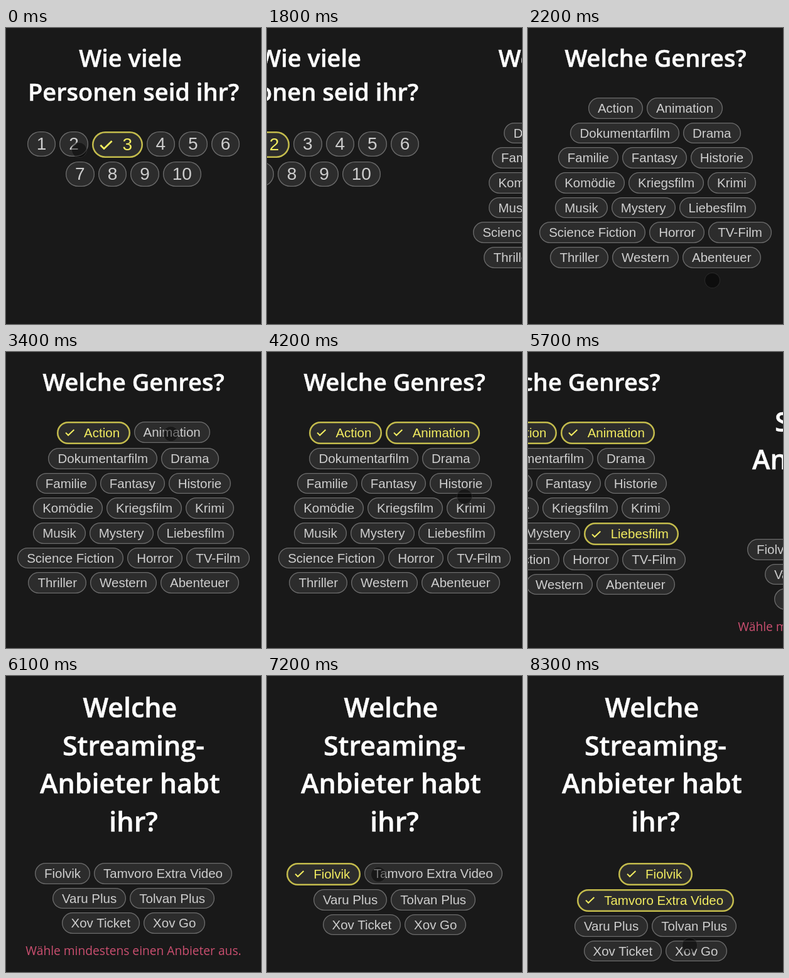
An HTML page for the animation above (8.4 s loop, 406 px wide and 472 px high).

```html
<!DOCTYPE html>
<html lang="de">
<head>
<meta charset="utf-8">
<title>Filmauswahl</title>
<style>
  html, body { margin: 0; width: 100%; height: 100%; overflow: hidden; background: #191919; }
  #stage { position: relative; width: 406px; height: 472px; overflow: hidden; }
  #track { position: absolute; inset: 0; }
  .screen { position: absolute; top: 0; width: 406px; height: 472px; }
  h1 {
    position: absolute; top: 20px; width: 100%; margin: 0;
    font: 600 38px/54px "Open Sans", "Noto Sans", sans-serif;
    text-align: center; white-space: pre; color: #fff; -webkit-text-stroke: .5px #fff;
  }
  .chips {
    position: absolute; width: 100%; display: flex; flex-direction: column; align-items: center; gap: 6px;
    font: 20.5px "Liberation Sans", Arial, sans-serif; --h: 33.7px;
  }
  .row { display: flex; flex-wrap: wrap; justify-content: center; align-items: flex-start; gap: 6px; width: 400px; }
  .chip {
    position: relative; padding: 0 15px; height: var(--h); line-height: var(--h); border-radius: 22px;
    white-space: nowrap; color: #cecece; background: #2c2c2c; box-shadow: inset 0 0 0 1.3px #6c6c6c;
  }
  .chip svg { display: none; position: absolute; left: 12.5px; top: 50%; width: .75em; height: .55em; margin-top: -.27em; }
  .chip path { fill: none; stroke: #f2ec60; stroke-width: 2; }
  .chip.on {
    height: calc(var(--h) + 2.3px); line-height: calc(var(--h) + 2.3px);
    padding: 0 16.5px 0 calc(27px + .77em); color: #f2ec60; box-shadow: inset 0 0 0 2.5px #c4bc4c;
  }
  .chip.on svg { display: block; }
  .digits .chips { font-size: 28px; --h: 40px; }
  .services h1 { font-size: 43px; line-height: 60.6px; }
  .services .row { width: 360px; }
  #hint {
    position: absolute; top: 424.5px; width: 100%; text-align: center; white-space: nowrap;
    font: 19.2px/26px "Open Sans", "Noto Sans", sans-serif; color: #cb4f70;
  }
  #cursor {
    position: absolute; left: -12.5px; top: -12.5px; width: 25px; height: 25px; box-sizing: border-box;
    border-radius: 50%; background: rgba(0, 0, 0, .45); border: 1px solid rgba(95, 95, 95, .35);
  }
</style>
</head>
<body>
<div id="stage"><div id="track"></div><div id="cursor"></div></div>
<script>
const LOOP = 8400, TICK = 100, STEP = 440, SLIDE_MS = 300;
const slideStarts = [1767, 5665];

// Trailing spaces in titles count when the lines are centred
const screens = [
  { kind: "digits", title: "Wie viele \nPersonen seid ihr?", top: 165,
    rows: ["1,2,3,4,5,6", "7,8,9,10"] },
  { kind: "genres", title: "Welche Genres?", top: 111,
    rows: ["Action,Animation", "Dokumentarfilm,Drama", "Familie,Fantasy,Historie", "Komödie,Kriegsfilm,Krimi",
      "Musik,Mystery,Liebesfilm", "Science Fiction,Horror,TV-Film", "Thriller,Western,Abenteuer"] },
  { kind: "services", title: "Welche \nStreaming-\nAnbieter habt \nihr?", top: 298,
    rows: ["Fiolvik,Tamvoro Extra Video", "Varu Plus,Tolvan Plus", "Xov Ticket,Xov Go"] }
];

// Chip label: [selected from, selected until]
const selected = {
  "3": [0, 200], "2": [200, LOOP],
  "Action": [2900, LOOP], "Animation": [3600, LOOP], "Liebesfilm": [4700, LOOP],
  "Fiolvik": [6900, LOOP], "Tamvoro Extra Video": [7500, LOOP]
};

// Pointer path: time, x, y
const path = [
  [0, 116, 194], [400, 116, 194], [700, 190, 411], [900, 230, 500],
  [1900, 300, 500], [2100, 297, 433], [2200, 293, 402], [2700, 140, 130], [3000, 140, 130],
  [3400, 262, 130], [3800, 262, 130], [4200, 314, 230], [4500, 300, 290], [4800, 300, 290],
  [5200, 300, 456], [5300, 300, 500], [6200, 260, 500], [6400, 230, 442], [6800, 92, 316],
  [7000, 92, 316], [7400, 262, 316], [7900, 262, 330], [8300, 257, 429], [LOOP, 257, 429]
];

const track = document.getElementById("track");
const cursor = document.getElementById("cursor");
const check = '<svg viewBox="0 0 15 11"><path d="M1 5.5 5 9.6 14 .9"/></svg>';
const chipHtml = name => `<div class="chip" data-name="${name}">${check}${name}</div>`;
const rowHtml = row => `<div class="row">${row.split(",").map(chipHtml).join("")}</div>`;

track.innerHTML = screens.map((s, i) =>
  `<section class="screen ${s.kind}" style="left:${i * STEP}px"><h1>${s.title}</h1>
  <div class="chips" style="top:${s.top}px">${s.rows.map(rowHtml).join("")}</div></section>`).join("");
track.lastElementChild.insertAdjacentHTML("beforeend",
  '<div id="hint">Wähle mindestens einen Anbieter aus.</div>');

const chips = [...track.querySelectorAll(".chip")];
const hint = document.getElementById("hint");
const clamp = v => Math.min(1, Math.max(0, v));
const easeOut = p => 1 - (1 - p) ** 3;

function pointerAt(t) {
  const i = path.findIndex(k => k[0] > t);
  const [t0, x0, y0] = path[i - 1], [t1, x1, y1] = path[i];
  const p = (t - t0) / (t1 - t0);
  return [x0 + (x1 - x0) * p, y0 + (y1 - y0) * p];
}

function draw(t) {
  const page = slideStarts.reduce((sum, s) => sum + easeOut(clamp((t - s) / SLIDE_MS)), 0);
  track.style.transform = `translateX(${-Math.round(page * STEP)}px)`;
  for (const chip of chips) {
    const span = selected[chip.dataset.name];
    chip.classList.toggle("on", !!span && t >= span[0] && t < span[1]);
  }
  hint.hidden = t >= selected["Fiolvik"][0];
  const [x, y] = pointerAt(t);
  cursor.style.transform = `translate(${x}px, ${y}px)`;
}

const start = performance.now();
function frame() {
  const t = (performance.now() - start) % LOOP;
  draw(Math.floor(t / TICK) * TICK);
  requestAnimationFrame(frame);
}
frame();
</script>
</body>
</html>
```
